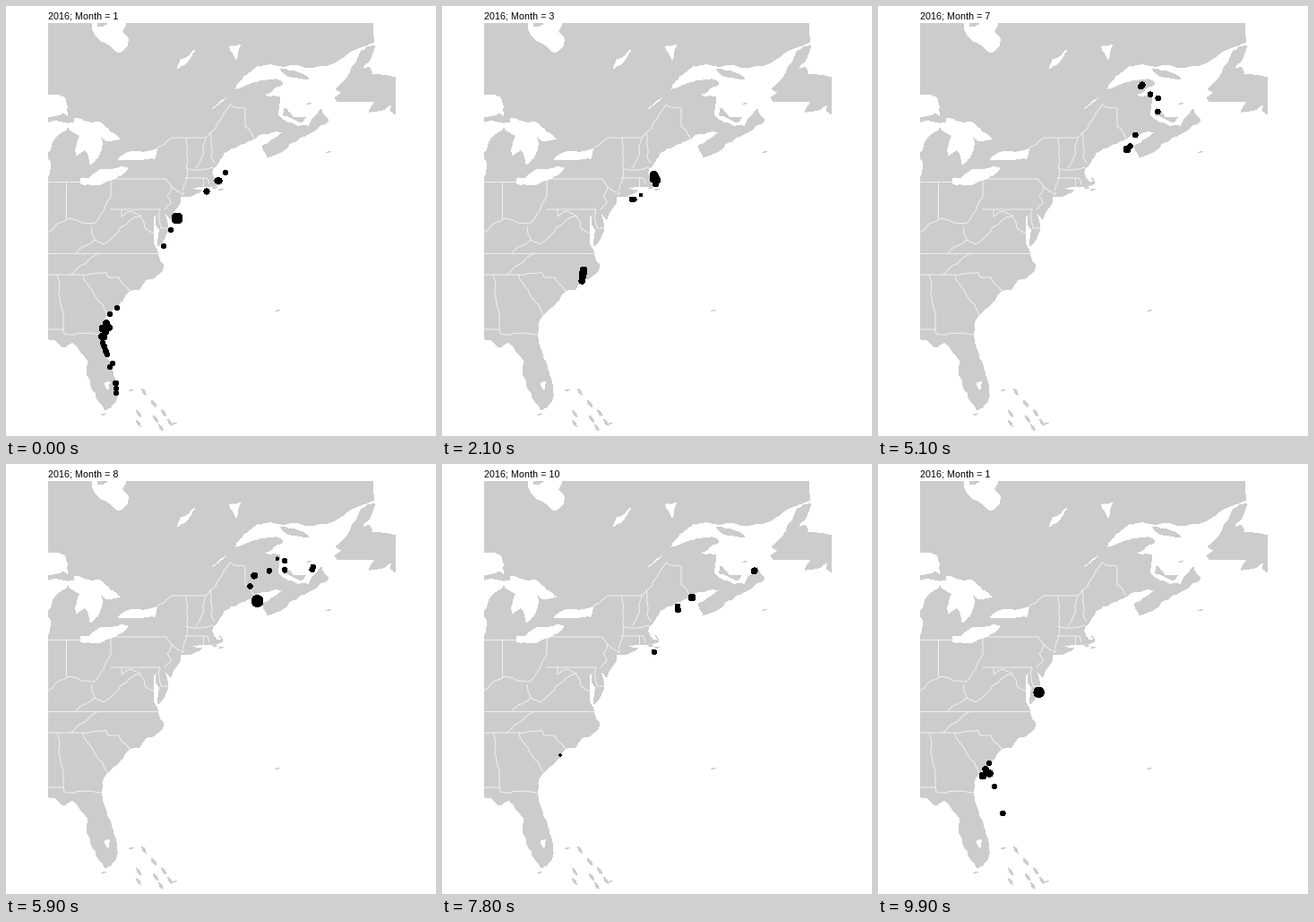
These frames come from a looping animation (480 by 480 pixels, 10000 ms). A matplotlib script:

```python
import random

import matplotlib.pyplot as plt
import numpy as np
from matplotlib.animation import FuncAnimation
from matplotlib.patches import Polygon, Rectangle

SIZE, DPI, FRAMES = 480, 100, 100
LAND = "#cccccc"
PX = 72 / DPI
rng = random.Random(16)

fig = plt.figure(figsize=(SIZE / DPI, SIZE / DPI), dpi=DPI, facecolor="white")
ax = fig.add_axes([0, 0, 1, 1])
ax.set(xlim=(0, SIZE), ylim=(SIZE, 0))
ax.axis("off")
panel = Rectangle((47, 19), 388, 455, fc="none", ec="none")
ax.add_patch(panel)


def rough(pts, depth=3, amount=0.1):
    """Break slanted segments into a ragged line; keep straight ones."""
    for _ in range(depth):
        out = [pts[0]]
        for (x0, y0), (x1, y1) in zip(pts, pts[1:]):
            if x0 != x1 and y0 != y1:
                k = rng.uniform(-amount, amount)
                out.append(((x0 + x1) / 2 - k * (y1 - y0),
                            (y0 + y1) / 2 + k * (x1 - x0)))
            out.append((x1, y1))
        pts = out
    return pts


def area(*pts, color=LAND):
    shape = Polygon(rough([*pts, pts[0]]), fc=color, ec="none", lw=0, aa=False, zorder=1)
    ax.add_patch(shape)
    shape.set_clip_path(panel)


def lake(*pts):
    area(*pts, color="white")


def islet(x, y, dx, dy):
    area((x - dx, y - dy), (x + 1, y - 1), (x + dx, y + dy), (x - 1, y + 1))


def border(*pts):
    x, y = zip(*rough(pts))
    line, = ax.plot(x, y, color="#f4f4f4", lw=0.9 * PX, zorder=2)
    line.set_clip_path(panel)


# Mainland coast, clockwise from the top left corner
north = [
    (40, 10), (407, 10), (411, 40), (393, 47), (359, 66), (294, 64), (280, 67),
    (261, 83), (227, 117), (242, 107), (276, 86), (305, 83), (309, 87), (282, 99),
    (305, 101), (303, 121), (314, 130), (338, 135), (352, 115), (360, 128),
    (343, 140), (316, 154), (292, 169), (286, 156), (306, 143), (319, 141),
    (302, 140), (282, 144), (261, 155), (243, 164), (231, 181), (229, 187),
    (235, 196), (241, 196), (238, 191), (242, 198), (224, 201)]
south = [
    (196, 209), (194, 220), (184, 238), (175, 229), (181, 249), (170, 268),
    (172, 250), (167, 243), (170, 232), (165, 235), (165, 266), (176, 290),
    (164, 304), (156, 306), (147, 317), (138, 318), (124, 335), (108, 352),
    (106, 369), (117, 401), (123, 426), (122, 442), (111, 451), (100, 432),
    (90, 411), (91, 395), (74, 375), (64, 381), (55, 373), (40, 369)]
area(*north, *south)

# Lakes and bays
lake((95, 14), (97, 27), (119, 47), (126, 52), (135, 45), (137, 37), (129, 29), (135, 14))
lake((191, 70), (195, 60), (211, 49), (206, 57))
lake((249, 45), (262, 43), (257, 60))
lake((40, 99), (65, 102), (69, 123), (64, 119), (46, 124))
lake((40, 134), (58, 129), (76, 130), (76, 125), (105, 130), (128, 149), (113, 151),
     (104, 143), (108, 153), (103, 168), (95, 177), (88, 160), (78, 167), (83, 145),
     (69, 135), (59, 143), (47, 163))
lake((40, 172), (47, 171), (50, 178), (46, 193))
lake((84, 192), (83, 198), (103, 200), (136, 181), (129, 179), (109, 182), (93, 192))
lake((125, 172), (152, 172), (166, 170), (168, 160), (138, 163))
lake((110, 421), (116, 419), (114, 428))

# Islands
area((101, 16), (103, 23), (113, 20))
area((195, 213), (202, 207), (219, 205), (205, 213))
area((311, 114), (310, 122), (329, 130), (335, 124), (320, 124))
area((306, 70), (321, 72), (338, 82), (318, 79))
area((412, 44), (397, 72), (406, 69), (408, 76), (440, 80), (440, 123), (429, 117),
     (432, 108), (417, 117), (405, 118), (412, 107), (371, 107), (367, 102), (375, 96),
     (368, 92), (384, 75), (397, 50))
for x, y in [(233, 203), (240, 205), (360, 163), (303, 340), (338, 109), (140, 429),
             (109, 456), (188, 466)]:
    islet(x, y, 3, -1)
for x, y in [(154, 431), (148, 455), (148, 466), (165, 444), (167, 461), (176, 454),
             (183, 465), (173, 471)]:
    islet(x, y, 3, 4)

# State lines
border((47, 196), (83, 196))
border((67, 196), (67, 237))
border((117, 193), (117, 213), (98, 243), (72, 237), (46, 253))
border((117, 227), (172, 227), (173, 248), (181, 248))
border((95, 247), (99, 261), (109, 266), (128, 247), (150, 234))
border((129, 227), (129, 235), (140, 229), (150, 234), (156, 249), (165, 254))
border((99, 261), (79, 275))
border((47, 275.5), (172, 275.5))
border((103, 276), (72, 300))
border((47, 300), (86, 300), (111, 297), (114, 303), (126, 303), (139, 318))
border((86, 300), (99, 323), (113, 345))
border((57, 300), (64, 342), (64, 361))
border((47, 361), (64, 361), (65, 366), (106, 367))
border((124, 188), (124, 193), (179, 193), (185, 202), (180, 212), (184, 220), (177, 227))
border((185, 202), (195, 208))
border((167, 160), (185, 147), (223, 147), (241, 124), (250, 110), (267, 114),
       (267, 135), (277, 147))
border((201, 147), (202, 181), (197, 206))
border((223, 147), (212, 181))
border((202, 181), (231, 180))
border((200, 192), (224, 192), (227, 199))
border((220, 192), (220, 202))
border((228, 141), (229, 167), (233, 175))


# Sightings: each dot is x, y, radius
def dot(x, y, r=2.8):
    return x, y, r


def row(a, b, n, r=2.8):
    """Dots spread evenly from a to b."""
    return [dot(x, y, r) for x, y in np.linspace(a, b, n)]


jan = [dot(191, 237, 6), dot(122.5, 421), dot(112, 387), dot(109, 369, 4),
       dot(108, 360, 4), dot(112, 354, 3.5), dot(116, 344),
       dot(245, 186), dot(224, 207, 3.2), dot(184, 250), dot(176, 268), dot(124, 337),
       *row((236, 195), (238, 195), 2, 3.2), *row((115, 359), (107, 369), 3, 3.6),
       *row((108, 376), (113, 389), 4), *row((119, 399), (116, 403), 2),
       *row((123, 427), (123, 432), 2)]
feb = [dot(107, 366, 4), dot(122, 410), *row((112, 387), (107, 372), 4),
       *row((237, 195), (184, 250), 6)]
mar = [*row((110, 362), (107, 364), 3, 3.4), dot(107, 373), *row((198, 229), (200, 229), 2),
       dot(212, 213, 1.5), *row((236, 189), (240, 196), 3, 4), *row((233, 193), (237, 200), 2)]
apr = [*row((238, 183), (240, 196), 3, 4.5), dot(238, 197, 4), *row((235, 194), (238, 194), 2),
       dot(239, 208, 2.5), *row((237, 187), (241, 196), 5, 4.2),
       *row((237, 200), (248, 189), 3, 4), dot(171, 253, 2.5)]
may = [dot(237, 177.5, 4), dot(230.5, 185, 4), dot(355, 119.7, 2.7), dot(237, 221.4),
       dot(243.6, 208), *row((236, 190), (259, 187), 5, 4.6),
       *row((240, 195), (257, 197), 4, 4.6), *row((255, 201), (250, 207), 2, 4.6)]
jun = [*row((250, 190), (255, 186), 3), *row((292, 130), (276, 162), 5)]
jul = [dot(302.5, 71, 3.2), dot(300.3, 73.5, 3.2), dot(312.2, 84), dot(316, 98.5),
       dot(316.5, 114.7), dot(288, 143.7), dot(281.8, 157), dot(278.3, 159.7, 4),
       dot(122, 441, 3)]
small = dot(303, 111.5, 1.5)
stay = [dot(281, 152, 6.8), dot(303, 72, 3.5), dot(306, 113), dot(290, 148), dot(238, 156),
        *row((290, 128), (291, 133), 2, 3), *row((249, 170), (269, 163), 5)]
aug = [small, dot(268, 147), dot(348, 120), dot(346, 121), dot(290, 120), dot(315, 114),
       dot(316, 100), *stay]
sep = [small, dot(242.8, 191.8), dot(306, 90.6, 3), dot(302.6, 93, 3), dot(287.2, 128.4, 3),
       dot(291, 150.4), dot(294.3, 163), *stay]
octo = [dot(135.4, 320.4, 1.1), dot(237, 210.8), dot(267, 153), dot(263.5, 163),
        dot(279, 149, 3.7), dot(348.7, 119.3, 3.4)]
nov = [dot(111.5, 352.5, 2.5), dot(236, 205), dot(239, 194)]
dec = [dot(111, 362, 3.3), dot(240, 204), dot(238, 198), dot(217.5, 205),
       dot(171, 276), dot(169, 262), dot(172, 274)]
MONTHS = [np.array(m, float) for m in
          (jan, feb, mar, apr, may, jun, jul, aug, sep, octo, nov, dec)]

dots = ax.scatter([], [], c="black", lw=0, antialiased=False, zorder=3)
title = ax.text(47, 14, "", family="Liberation Sans", size=10.8 * PX, va="baseline")


def phase(n):
    """Index of the running change and how far it has gone."""
    if n < 45:
        return n // 9, min(n % 9 / 8, 1)
    k, step = divmod(n - 45, 8)
    return 5 + k, min(step / 7, 1)


def draw(n):
    k, t = phase(n)
    old, new = MONTHS[k], MONTHS[(k + 1) % 12]
    if t >= 1:
        pts = new
    else:
        # Unpaired dots stay put until the change is over
        pts = old.copy()
        m = min(len(old), len(new))
        pts[:m] += t * (new[:m] - old[:m])
    dots.set_offsets(pts[:, :2])
    dots.set_sizes((2 * pts[:, 2] * PX) ** 2)
    month = (k + (t >= 0.5)) % 12 + 1
    title.set_text(f"2016; Month = {month}")
    return dots, title


anim = FuncAnimation(fig, draw, frames=FRAMES, interval=100, repeat=True,
                     repeat_delay=0, blit=False)
plt.show()
```
